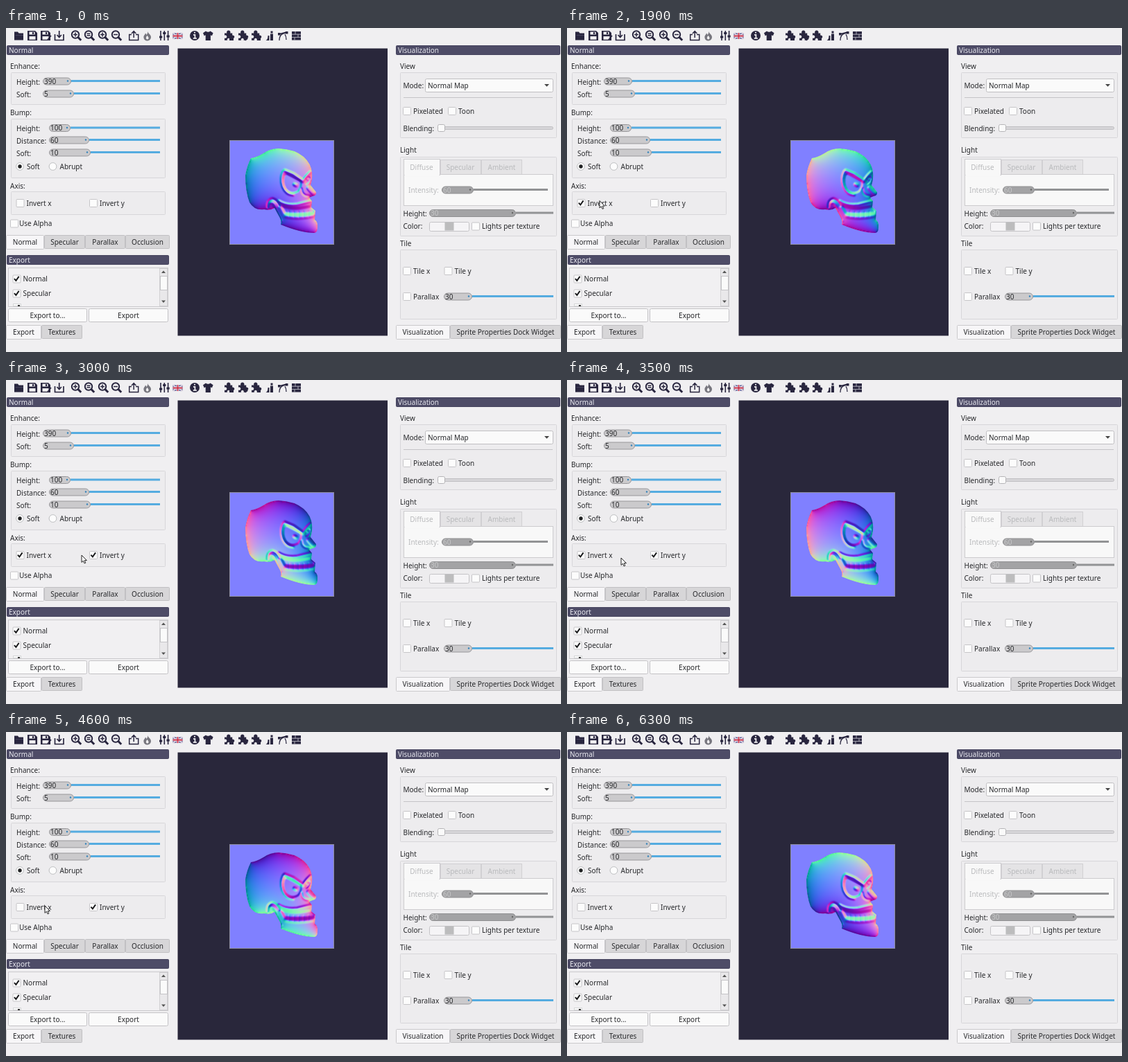
Animation, 800 px wide and 468 px high, one loop 6.9 s. Source, as an HTML page with a canvas:

```html
<!DOCTYPE html>
<html lang="en">
<head>
<meta charset="utf-8">
<title>Normal map editor</title>
<style>
html, body { margin: 0; width: 800px; height: 468px; overflow: hidden; background: #f0eff1; }
body { position: relative; }
svg, canvas { position: absolute; left: 0; top: 0; display: block; }
#skull { left: 323px; top: 163px; }
text { font: 10px "Noto Sans", "Open Sans", sans-serif; white-space: pre; }
</style>
</head>
<body>
<svg id="ui" width="800" height="468"></svg>
<canvas id="skull" width="150" height="150"></canvas>
<svg id="overlay" width="800" height="468">
  <rect x="322.5" y="162.5" width="150" height="150" fill="none" stroke="#8e8e9e"/>
  <path id="cursor" d="M0 0V10.4L2.4 8.2 4.1 11.9 5.8 11.1 4.2 7.6H7.4Z" fill="#fff" stroke="#222" stroke-width="1"/>
</svg>
<script>
const INK = '#27282b', DIM = '#b9babc', ICON = '#29263f', BLUE = '#55ace0';

// ---- interface pieces
const label = (x, cy, s, fill = INK, anchor = 'start') =>
  `<text x="${x}" y="${cy + 3.6}" fill="${fill}" text-anchor="${anchor}">${s}</text>`;
const rect = (x1, y1, x2, y2, fill, stroke = 'none', r = 0) =>
  `<rect x="${x1 + .5}" y="${y1 + .5}" width="${x2 - x1 - 1}" height="${y2 - y1 - 1}" rx="${r}" fill="${fill}" stroke="${stroke}"/>`;
const line = (d, stroke = ICON, w = 1.5, fill = 'none') =>
  `<path d="${d}" fill="${fill}" stroke="${stroke}" stroke-width="${w}"/>`;
const solid = (d, fill = ICON) => `<path d="${d}" fill="${fill}" fill-rule="evenodd"/>`;
const group = (x1, y1, x2, y2) => rect(x1, y1, x2, y2, '#edecee', '#d7d6d9', 1);
const title = (x1, y, x2, s) => rect(x1, y, x2, y + 14, '#4e4c67', '#45435e', 1) + label(x1 + 3, y + 7.3, s, '#e9e9f0');
const tick = (x, y, id = '') =>
  `<path ${id && `id="${id}"`} d="M${x + 2.4} ${y + 5.6}l2.5 2.8 4.2-6" fill="none" stroke="#17181a" stroke-width="1.9"/>`;
const box = (x, y) => rect(x, y, x + 12, y + 12, '#fcfcfc', '#c6c5c8', 1);
const option = (x, cy, s, gap = 15) => box(x, cy - 6) + label(x + gap, cy, s);
const radio = (x, cy, s, on) =>
  `<circle cx="${x}" cy="${cy}" r="5.4" fill="#fcfcfc" stroke="#bcbec0"/>` +
  (on ? `<circle cx="${x}" cy="${cy}" r="2.7" fill="#1f2022"/>` : '') + label(x + 10, cy, s);
const slider = (x1, x2, end, cy, value, off) =>
  line(`M${x2} ${cy}H${end}`, off ? '#929395' : BLUE, 3) +
  rect(x1, cy - 5, x2, cy + 6, off ? '#a3a3a5' : '#cbcacc', off ? '#8f8f91' : '#98979a', 5) +
  label(x1 + 2, cy + .8, value, off ? '#c6c7c8' : INK) +
  `<circle cx="${x2 - 5}" cy="${cy}" r="1.2" fill="${off ? '#666' : '#3584bb'}"/>`;
const tab = (x1, x2, y, s, on, h = 21) =>
  (on ? rect(x1, y, x2, y + h, '#f7f6f8', '#cac9cc', 1) : rect(x1, y, x2, y + h - 1, '#d7d6d8', '#c1c0c3', 1)) +
  label((x1 + x2) / 2, y + h / 2, s, INK, 'middle');
const button = (x1, y1, x2, y2, s) =>
  rect(x1, y1, x2, y2, '#fafafa', '#c3c2c5', 2) + label((x1 + x2) / 2, (y1 + y2) / 2, s, INK, 'middle');

// ---- toolbar icons
const floppy = x => solid(`M${x - 7} 4h11l3 3v11h-14z M${x - 4.5} 5.5v4h8v-4z M${x - 4.5} 12v4.7h9V12z`) +
  solid(`M${x} 6h2v3h-2z`);
const lens = (x, mark) => `<circle cx="${x - 1}" cy="9.5" r="5.2" fill="none" stroke="${ICON}" stroke-width="2"/>` +
  line(`M${x + 2.5} 13l4.7 4.8`, ICON, 3) + line(mark, ICON, 1.5);
const piece = (x, badge) => solid(`M${x - 6} 7.5h3.4a2.7 2.7 0 1 1 4.8 0h3v3a2.4 2.4 0 1 1 0 4.6v2.6h-3.6a2 2 0 1 0-3.6 0h-4v-3.2a2.2 2.2 0 1 0 0-3.8z`) +
  solid(badge);
const toolbar = () =>
  solid('M12 5.5h5l1.5 2H25v10H12z') + line('M13.5 10.6H25', '#55536a', .7) +
  floppy(38) + floppy(57) + line('M60 17l5-6', ICON, 1.6) +
  line('M70.5 9v8.5H83V9M76.7 4v9M73.5 10l3.2 3.5 3.2-3.5', ICON, 1.7) +
  lens(101, 'M97 9.5h6M100 6.5v6') + lens(120, 'M116.5 8.2h5M116.5 10.7h5') +
  lens(140, 'M136 9.5h6M139 6.5v6') + lens(159, 'M155 9.5h6') +
  line('M181 9.5h-3.3v8h13v-8H187M184.2 14V5M181 8l3.2-3.5 3.2 3.5') +
  solid('M204 4c0 4 5 5 5 9a5.3 5.3 0 0 1-10.6.5c0-3 2-3.5 2.6-6 1 .8 1.5 1.8 1.5 2.8 1.5-2 1.9-4 1.5-6.3z M203.5 11c-2 2-2.4 5 .3 5.5 2.8-.4 2-3.5-.3-5.5z', '#77767e') +
  line('M223 4v14M228.3 4v14M233.6 4v14', ICON, 1.6) + line('M221 13h4.2M226.2 7.5h4.2M231.5 12h4.2', ICON, 3) +
  rect(240, 7, 255, 16, '#343b83') + line('M240.5 7.5l14 8M254.5 7.5l-14 8', '#e6dce5') +
  line('M240.5 11.5h14M247.5 7v9', '#f4ecef', 3.6) + line('M240.5 11.5h14M247.5 7v9', '#c8324b', 1.8) +
  `<circle cx="272" cy="11" r="7" fill="${ICON}"/>` + line('M270 9.8h2.4v5M269.8 14.9h5M271 6.7h2', '#f0eff1', 1.7) +
  solid('M288 4.5q3.3 2.5 6.6 0l4 2.7-1.7 4-2-.9V18h-7.200v-7.7l-2 .9-1.7-4z') +
  piece(321, 'M322 14h6v4h-6z') + piece(341, 'M343 13l6 2.5-4 3z') + piece(360, 'M362 13h5v5h-5z') +
  solid('M374.5 18c2.5-1 3-4 3-7h2v7z M381 8.5h4V18h-4z M381.5 4.5h3v3h-3z') +
  line('M394 18c0-7 4-11 11-11M393 9l11-3M402 9c2 3 2 5 2 8', ICON, 1.3) + solid('M392 7h3.5v3.5H392zM403 5h3.5v3.5H403z') +
  solid('M412 5h13v12.5h-13z') + line('M412 9.2h13M412 13.4h13M417 5v4M421 9v4.5M416 13.5v4', '#b9b9c2', .9);

const leftPanel = () =>
  title(1, 25, 235, 'Normal') + label(6, 55, 'Enhance:') + group(7, 64, 230, 111) +
  label(15, 78, 'Height:') + slider(53, 94, 222, 76.5, 390) +
  label(15, 96, 'Soft:') + slider(53, 98, 222, 94.5, 5) +
  label(6, 122, 'Bump:') + group(7, 131, 230, 217) +
  label(15, 145.5, 'Height:') + slider(62, 93, 222, 144, 100) +
  label(15, 163, 'Distance:') + slider(62, 120, 222, 161.5, 60) +
  label(15, 181, 'Soft:') + slider(62, 122, 222, 179.5, 10) +
  radio(20, 200, 'Soft', true) + radio(67.5, 200, 'Abrupt') +
  label(6, 228, 'Axis:') + group(7, 236, 230, 270) +
  option(14.5, 253, 'Invert x') + tick(14.5, 247, 'tickX') +
  option(120, 253, 'Invert y') + tick(120, 247, 'tickY') + option(6, 282.5, 'Use Alpha', 13) +
  tab(0, 55, 299, 'Normal', true) + tab(55, 114, 299, 'Specular') + tab(114, 172, 299, 'Parallax') + tab(172, 236, 299, 'Occlusion') +
  title(1, 328, 235, 'Export') + rect(3, 346, 234, 403, '#f1f0f2', '#cac9cc') +
  option(9.5, 362.5, 'Normal') + tick(9.5, 356.5) + option(9.5, 383.5, 'Specular') + tick(9.5, 377.5) +
  rect(10, 398, 22, 402, '#fcfcfc', '#d5d6d7') + solid('M17 400h3v2h-3z', '#333') +
  rect(221, 347, 233, 402, '#e9e8ea', '#d1d0d3') + rect(222, 358, 233, 379, '#fafafa', '#c5c4c7') +
  solid('M224 354l3-3.5 3 3.5zM224 393.5l3 3.5 3-3.5z', '#555') +
  button(3, 405, 117, 425, 'Export to...') + button(119, 405, 234, 425, 'Export') +
  tab(0, 51, 429, 'Export', true) + tab(51, 110, 429, 'Textures');

const rightPanel = () =>
  title(562, 25, 799, 'Visualization') + label(568, 55, 'View') + group(568, 64, 794, 159) +
  label(572.5, 83, 'Mode:') + rect(604, 73, 789, 93, '#fafafa', '#c0bfc2', 2) + label(608, 83.3, 'Normal Map') +
  solid('M776 81h7l-3.5 3.8z', '#444') + line('M573 100.5H788', '#c5c4c7', 1) +
  option(572, 120, 'Pixelated') + option(637, 120, 'Toon') +
  label(572.5, 145, 'Blending:') + rect(622, 142, 789, 147, '#d6d5d8', '#c0bfc2', 2) + rect(622, 139, 633, 150, '#fafafa', '#b5b4b7', 2) +
  label(568, 176, 'Light') + group(568, 186, 794, 301) +
  rect(626, 190, 685, 212, '#e4e3e5', '#d1d0d3') + rect(685, 190, 744, 212, '#e4e3e5', '#d1d0d3') +
  rect(573, 211, 789, 257, '#f8f8f8', '#cccbce') + rect(573, 189, 626, 213, '#f8f8f8', '#cccbce') + rect(574, 209, 625, 215, '#f8f8f8') +
  label(599, 201, 'Diffuse', DIM, 'middle') + label(655, 201.5, 'Specular', DIM, 'middle') + label(714.5, 201.5, 'Ambient', DIM, 'middle') +
  label(580, 234.5, 'Intensity:', DIM) + slider(628, 674, 781, 233.5, 60, true) +
  label(572.5, 268, 'Height:') + slider(610, 735, 789, 267, 30, true) +
  label(572.5, 286.5, 'Color:') + rect(610, 280, 668, 294, '#f5f4f6', '#c5c4c7', 2) + rect(632, 280, 646, 293, '#bcbcbd') +
  option(671, 286.5, 'Lights per texture') +
  label(568, 311.5, 'Tile') + group(568, 320, 794, 421) +
  option(572, 351, 'Tile x') + option(631.5, 351, 'Tile y') +
  option(572, 388, 'Parallax') + slider(631, 672, 789, 387.5, 30) +
  tab(562, 640, 429, 'Visualization', true) + tab(640, 800, 429, 'Sprite Properties Dock Widget');

document.getElementById('ui').innerHTML = toolbar() + leftPanel() +
  '<rect x="247.500" y="29.500" width="302.500" height="415" fill="#29273b"/>' + rightPanel();

// ---- skull: a height field shaded as a normal map
const SIZE = 150, AREA = SIZE * SIZE;
const skull = document.getElementById('skull').getContext('2d');

function blur(src, rounds) {
  for (let k = 0; k < rounds; k++) for (const step of [1, SIZE]) {
    const from = src;
    src = from.map((v, i) => (v * 2 + (from[i - step] || 0) + (from[i + step] || 0)) / 4);
  }
  return src;
}

function layer(d, width, rounds) {
  const ctx = Object.assign(document.createElement('canvas'), { width: SIZE, height: SIZE }).getContext('2d');
  ctx.translate(-323, -163);
  ctx.lineWidth = width;
  ctx.lineCap = ctx.lineJoin = 'round';
  const path = new Path2D(d);
  if (width) ctx.stroke(path); else ctx.fill(path);
  const data = ctx.getImageData(0, 0, SIZE, SIZE).data;
  return blur(Float32Array.from({ length: AREA }, (_, i) => data[i * 4 + 3] / 255), rounds);
}

const mask = layer(`M353 188Q361 187 371 181Q381 174 393 174Q416 175 429 186Q440 196 441 209
  Q442 217 439 227L447 237Q448 242 442 243L437 245 441 250 440 259 446 264 445 277Q450 280 449 288
  Q449 296 444 296Q425 296 396 284Q398 279 393 271L387 260Q381 264 372 262Q358 264 351 252
  Q345 236 345 213Q347 200 353 188Z`, 0, 0);

// Inflate the outline by relaxation, then flatten the middle.
function inflate() {
  const h = new Float32Array(AREA);
  for (let k = 0; k < 180; k++)
    for (let i = SIZE; i < AREA - SIZE; i++)
      if (mask[i] > .5) h[i] += 1.9 * ((h[i - 1] + h[i + 1] + h[i - SIZE] + h[i + SIZE]) / 4 + 1 - h[i]);
  return blur(h.map(v => 1.6 * Math.max(v, 0) ** .4), 1);
}

// amount, path, stroke width (0 fills), blur rounds
const details = [
  [-5, 'M401 212Q397 224 403 233Q411 242 421 236Q427 229 425 221L404 210Z', 0, 2],
  [4, 'M400 207Q395 217 399 229Q404 241 414 241', 2.5, 2],
  [5, 'M402 206L414 211 428 221 434 213 440 207', 3.4, 2],
  [-4, 'M431 219Q437 211 439 217Q438 224 432 226Z', 0, 1],
  [4, 'M416 226L418 227', 4, 2],
  [2, 'M434 218L435 219', 2, 1],
  [-4, 'M426 232Q426 240 432 242L438 243', 2, 2],
  [4, 'M436 231L443 239', 5, 2],
  [-5, 'M377 259Q377 248 384 247Q391 249 394 257', 2.4, 2],
  [4, 'M381 253Q387 251 389 262L397 279', 3, 2],
  [4, 'M393 250Q404 257 420 255L440 250', 3, 2],
  [-9, 'M396 256Q408 261 423 260L442 257 445 267Q421 271 402 268Z', 0, 4],
  [3, 'M403 272Q421 276 444 271', 4, 2],
  [-1.6, 'M408 264V273M415 265V274M422 265V274M429 265V274M436 264V273', 1, 1]
];

const height = inflate();
for (const [amount, d, width, rounds] of details)
  layer(d, width, rounds).forEach((v, i) => height[i] += amount * v);

function shade(invertX, invertY) {
  const image = skull.createImageData(SIZE, SIZE);
  for (let i = 0; i < AREA; i++) {
    const dx = ((height[i + 1] || 0) - (height[i - 1] || 0)) / 2;
    const dy = ((height[i + SIZE] || 0) - (height[i - SIZE] || 0)) / 2;
    const scale = 127 * mask[i] / Math.hypot(dx, dy, 1);
    image.data[i * 4] = 128 + dx * scale * (invertX ? 1 : -1);
    image.data[i * 4 + 1] = 128 + dy * scale * (invertY ? -1 : 1);
    image.data[i * 4 + 2] = 128 + 127 * (1 - mask[i]) + scale;
    image.data[i * 4 + 3] = 255;
  }
  skull.putImageData(image, 0, 0);
}

// ---- timeline
const LOOP = 6900, STEP = 100;
const pointer = [ // time, x, y
  [100, 790, 430], [700, 499, 283], [1100, 36, 240], [1200, 47, 249], [1900, 47, 249.5],
  [2000, 84, 252], [2400, 137, 253], [2500, 140, 254.5], [2900, 140, 254], [3200, 47, 251],
  [3500, 78, 257], [3700, 56, 251], [4700, 56, 251], [4800, 50, 250], [5200, 132, 249.5],
  [5300, 138, 252], [5900, 138, 252], [6200, 760, 442], [6300, 800, 468]
];
const byId = id => document.getElementById(id);
const cursor = byId('cursor'), tickX = byId('tickX'), tickY = byId('tickY');
const within = (t, from, to) => t >= from && t < to;
const show = (el, on) => el.setAttribute('visibility', on ? 'visible' : 'hidden');
let shaded = '';

function update(t) {
  show(tickX, within(t, 1400, 4200));
  show(tickY, within(t, 2700, 5500));

  // The map is recomputed a little after each click.
  const axes = [within(t, 1700, 4400), within(t, 3000, 5700)];
  if (shaded !== String(axes)) {
    shade(...axes);
    shaded = String(axes);
  }

  const visible = within(t, 100, 6300);
  show(cursor, visible);
  if (!visible) return;
  const next = pointer.findIndex(p => p[0] > t);
  const a = pointer[next - 1], b = pointer[next];
  const k = (t - a[0]) / (b[0] - a[0]);
  const mix = n => a[n] + (b[n] - a[n]) * k;
  cursor.setAttribute('transform', `translate(${mix(1)} ${mix(2)})`);
}

const start = performance.now();
function frame() {
  const t = (performance.now() - start) % LOOP;
  update(Math.floor(t / STEP) * STEP);
  requestAnimationFrame(frame);
}
frame();
</script>
</body>
</html>
```
